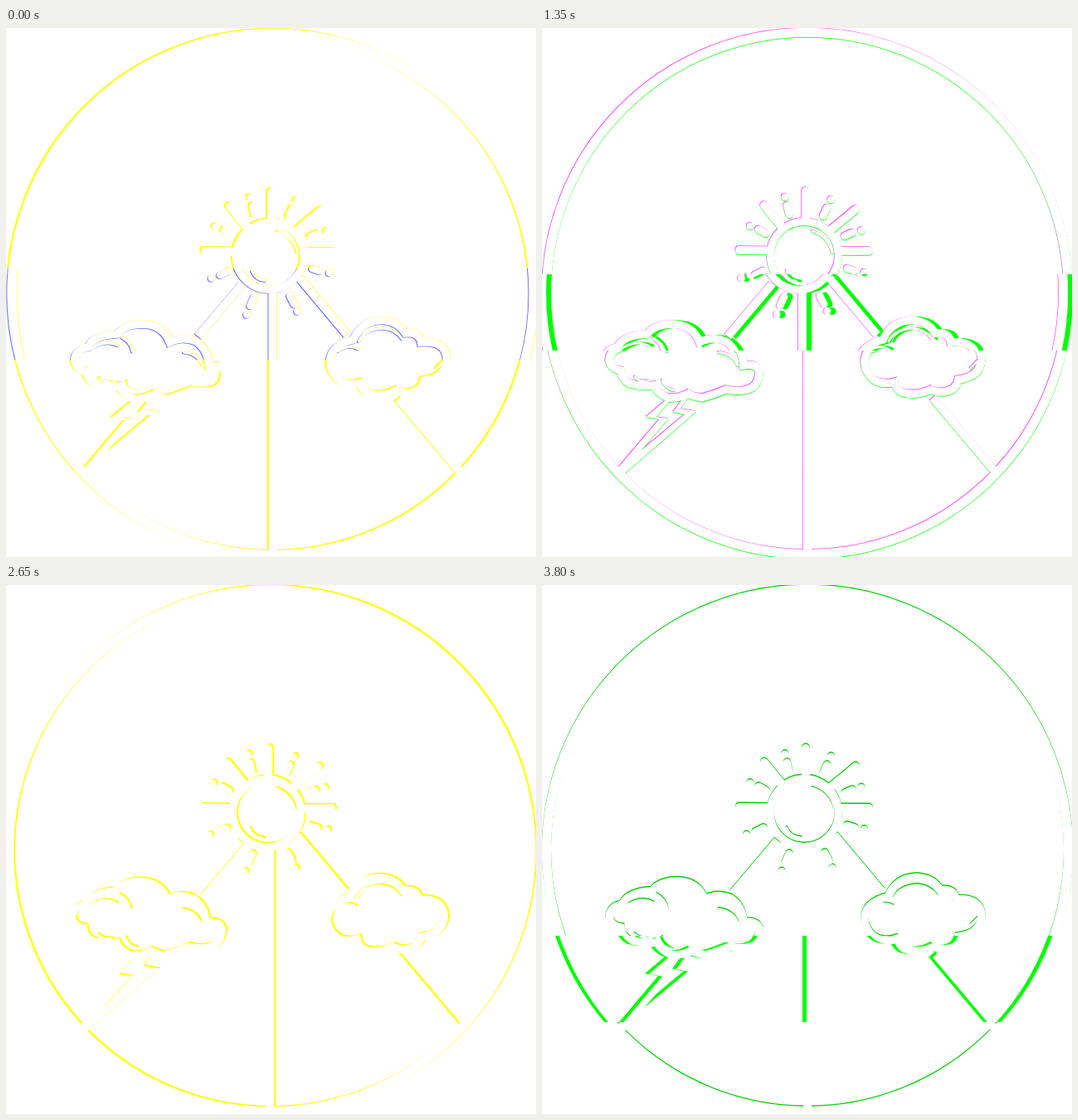
Write an HTML page with a canvas that moves like this. It is 639 px wide and 638 px high and loops after 3.9 s.

```html
<!DOCTYPE html>
<html lang="en">
<head>
<meta charset="utf-8">
<title>Weather peace sign glitch</title>
<style>
html, body { margin: 0; width: 100%; height: 100%; overflow: hidden; background: #fff; }
canvas { display: block; width: 100%; height: 100%; }
</style>
</head>
<body>
<canvas id="stage" width="639" height="638"></canvas>
<script>
const W = 639, H = 638, LOOP = 3900;
const ctx = document.getElementById('stage').getContext('2d');

// The drawing: strokes grouped by width, plus the lightning bolt as a fill.
const ring = new Path2D();
ring.arc(320, 320, 314.6, 0, 2 * Math.PI);

const sun = new Path2D();
sun.arc(316.3, 274.5, 41, 0, 2 * Math.PI);

const clouds = new Path2D(`
  M81 401 Q82 388 97 385 Q104 370 133 369 Q142 357 164 357 Q188 358 196 379
  Q212 371 228 378 Q242 388 243 407 Q258 404 262 414 Q262 428 253 434
  Q241 440 222 436 Q208 442 193 446 Q180 444 176 441 Q165 447 152 446
  Q138 440 135 431 Q120 433 106 429 Q96 424 95 413 Q83 411 81 401Z
  M389 403 Q389 383 417 376 Q428 352 453 352.5 Q472 354 480 368 Q497 366 499 379
  Q530 377 530 400 Q528 421 502 424 Q499 440 478 439 Q472 438 469 436
  Q450 445 433 439 Q426 434 425 427 Q410 431 400 424 Q389 415 389 403Z`);

const legs = new Path2D(`
  M320 319V630 M284 308L230 372 M352.5 301.5L410 370 M471 446L546 535`);

const rays = new Path2D(`
  M318 197V231 M238 268L273 268.5 M394 269H360 M268 214L289 240 M378 219L349 243`);

const sparks = new Path2D(`
  M295.5 214L298 225 M343.5 217L339 227 M261 243L270 248 M365 251L374 247
  M257 298L267 293 M368 290L377 293 M298 324L293 335 M341 323L346 333
  M293 204h.01 M348.5 207h.01 M251 239h.01 M385 244.5h.01
  M246.5 301.5h.01 M388.5 295h.01 M289 345.5h.01 M350 341.5h.01`);

const details = new Path2D(`
  M326 245Q345 251 350 271 M295 293Q299 304 312 305
  M100 388Q118 375 134 383 M138 373Q149 379 151 390 M112 421Q117 427 128 426
  M145 425Q148 435 159 437 M213 391Q230 393 236 407
  M424 378Q430 364 452 362Q468 363 476 375 M399 390Q412 381 423 387 M517 410L525 402`);

const bolt = new Path2D(`
  M150 448L125 469L141 472L92 530L99 538L165 481L186 462L167 459L176 446Z
  M155 449L138 469L153 471L119 510L172 466L158 463L170 447Z`);

const STROKES = [
  [ring, 11.2, 'butt'], [sun, 9, 'butt'], [clouds, 9.5, 'butt'], [legs, 10, 'butt'],
  [rays, 10, 'round'], [sparks, 9, 'round'], [details, 3, 'round']
];

function drawArt(color, dx, dy) {
  ctx.save();
  ctx.translate(dx, dy);
  ctx.strokeStyle = ctx.fillStyle = color;
  ctx.miterLimit = 3;
  for (const [path, width, cap] of STROKES) {
    ctx.lineWidth = width;
    ctx.lineCap = cap;
    ctx.stroke(path);
  }
  ctx.fill(bolt, 'evenodd');
  ctx.restore();
}

// Coloured ghosts peek out from under a white copy, within one horizontal slice.
function drawSlice(top, bottom, ghosts, cover) {
  ctx.save();
  ctx.beginPath();
  ctx.rect(0, top, W, bottom - top);
  ctx.clip();
  ctx.fillStyle = '#fff';
  ctx.fillRect(0, top, W, bottom - top);
  for (const ghost of ghosts) drawArt(...ghost);
  drawArt('#fff', ...cover);
  ctx.restore();
}

const yellow = (x, y) => ['#ff0', x, y];
const cyan = (x, y) => ['#0ff', x, y];
const green = (x, y) => ['#0f0', x, y];
const darkGreen = (x, y) => ['#00d000', x, y];
const magenta = (x, y) => ['#ff50ff', x, y];
const blue = (x, y) => ['#7070ff', x, y];

const still = [0, 0];
const yellowUp = [[yellow(0, -1)], [-.5, .3]];
const yellowUpRight = [[yellow(.3, -1)], [-1.7, .4]];
const cyanDown = [[cyan(0, 0)], [.6, -1]];
const twoTone = [[magenta(.7, -1), darkGreen(0, 1.5)], still];
const twoToneLight = [[magenta(-.8, -.8), green(0, .8)], still];

// [start ms, [ghosts, white offset], optional band: top, bottom, ghosts, white offset]
const STATES = [
  [0, [[yellow(0, 0)], [2, 1]], [290, 400, [yellow(2, -.3), blue(.5, .7)], [1.5, 0]]],
  [50, yellowUpRight],
  [200, twoTone],
  [350, cyanDown],
  [500, [[cyan(0, 0)], [1, -1]]],
  [650, cyanDown],
  [800, twoTone],
  [950, yellowUpRight],
  [1050, twoToneLight],
  [1200, yellowUp],
  [1350, twoToneLight, [297, 389, [magenta(-6.8, 0), green(0, 0)], [-6, 0]]],
  [1500, yellowUp],
  [1650, yellowUpRight],
  [1800, yellowUp],
  [1950, twoToneLight],
  [2100, yellowUp, [374, 454, [yellow(-6, 0)], [-1.8, 0]]],
  [2250, twoTone],
  [2350, yellowUp],
  [2500, twoToneLight],
  [2650, yellowUpRight],
  [2800, cyanDown],
  [2950, cyanDown],
  [3100, twoToneLight],
  [3200, [[yellow(0, 0)], [2, 1]]],
  [3350, [[cyan(0, 0)], [1, -1]]],
  [3500, cyanDown],
  [3650, yellowUp],
  [3800, [[darkGreen(0, -1.4)], still], [423, 527, [green(-1, -.5)], [4, 0]]]
];

let shown;
function frame() {
  const time = performance.now() % LOOP;
  const state = STATES.findLast(([start]) => start <= time);
  if (state !== shown) {
    shown = state;
    const [, look, band] = state;
    drawSlice(0, H, ...look);
    if (band) drawSlice(...band);
  }
  requestAnimationFrame(frame);
}
frame();
</script>
</body>
</html>
```
